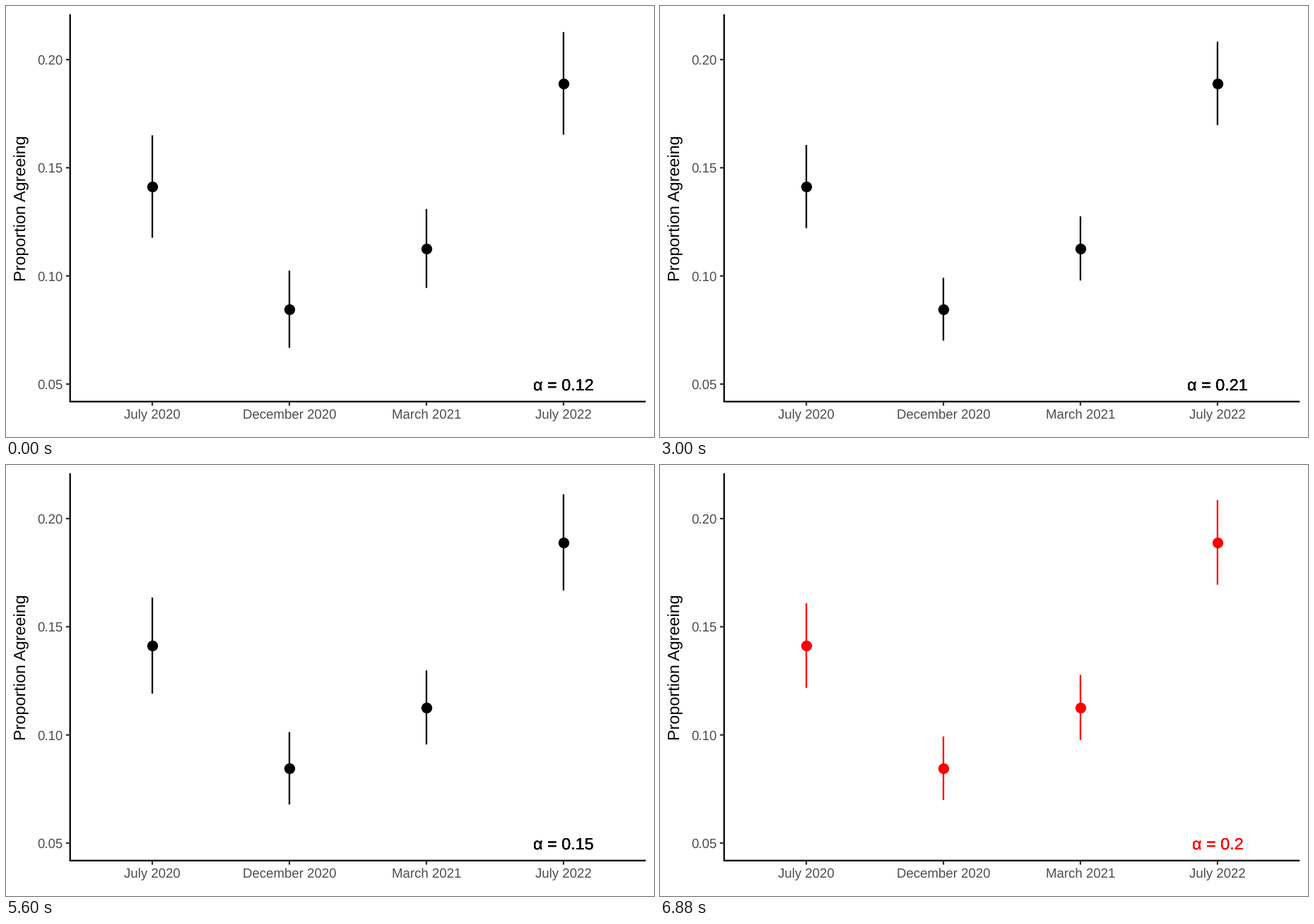
Animation of 917x611 px, one loop 8 s. Source, as a matplotlib script:

```python
import math

import matplotlib.pyplot as plt
import numpy as np
from matplotlib.animation import FuncAnimation

WIDTH, HEIGHT, DPI = 917, 611, 64
PT = 72 / DPI                      # points per pixel
LINE = 2.27 * PT
LEFT, RIGHT, TOP, BOTTOM = 90.7, 905.3, 11.7, 560.8
TICK = 5.8
SMALL, LARGE = 18.68, 23.35        # font sizes in pixels
CAP = 0.716                        # cap height relative to font size

FRAMES, INTERVAL = 200, 40
SWITCH = 105                       # transitions get shorter from here on
FLASH = 171                        # one grey frame, then the result in red

WAVES = ["July 2020", "December 2020", "March 2021", "July 2022"]
ESTIMATES = np.array([0.1413, 0.0846, 0.1127, 0.1890])
ERRORS = np.array([0.01523, 0.01148, 0.01174, 0.01526])

# Alpha in percent: up, back down, and up again to the chosen level.
LEVELS = [*range(12, 23), *range(22, 11, -1), *range(12, 21)]


def critical_value(alpha):
    grid = np.linspace(0, 3, 3001)
    coverage = [math.erf(z / math.sqrt(2)) for z in grid]
    return np.interp(1 - alpha, coverage, grid)


CRITICAL = [critical_value(level / 100) for level in LEVELS]


def x_px(index):
    return LEFT + (index + 0.6) * (RIGHT - LEFT) / 4.2


def y_px(value):
    return 536.0 - (value - 0.05) * 3067


def position(frame):
    """Place in LEVELS: a short linear move, then a rest on each level."""
    if frame < SWITCH:
        index, step = divmod(frame - 3, 6)
        moved = min((step + 1) / 3, 1)
    else:
        index, step = divmod(frame - SWITCH, 5)
        index += 17
        moved = min((step + 1) / 2, 1)
    return min(index + moved, len(LEVELS) - 1)


plt.rcParams.update({"font.family": "Liberation Sans", "text.hinting": "none"})
fig = plt.figure(figsize=(WIDTH / DPI, HEIGHT / DPI), dpi=DPI)
ax = fig.add_axes([0, 0, 1, 1])
ax.set_xlim(0, WIDTH)
ax.set_ylim(HEIGHT, 0)
ax.axis("off")


def draw_line(xs, ys, color="black"):
    return ax.plot(xs, ys, color=color, lw=LINE, snap=False,
                   solid_capstyle="butt", solid_joinstyle="miter")[0]


def draw_text(x, y, text, size, color="black", ha="center", rotation=0):
    return ax.text(x, y, text, fontsize=size * PT, color=color, ha=ha,
                   va="baseline", rotation=rotation, rotation_mode="anchor")


draw_line([LEFT, LEFT, RIGHT], [TOP, BOTTOM, BOTTOM])
tick_labels = []
for value in (0.05, 0.10, 0.15, 0.20):
    y = y_px(value)
    draw_line([LEFT - TICK, LEFT], [y, y], "#333333")
    tick_labels.append(
        draw_text(80.2, y + CAP * SMALL / 2, f"{value:.2f}", SMALL, ha="right"))
for i, wave in enumerate(WAVES):
    draw_line([x_px(i)] * 2, [BOTTOM, BOTTOM + TICK], "#333333")
    tick_labels.append(draw_text(x_px(i), 585.2, wave, SMALL))
draw_text(28.6, (TOP + BOTTOM) / 2, "Proportion Agreeing", LARGE, rotation=90)

bars = [draw_line([x_px(i)] * 2, [0, 0]) for i in range(len(WAVES))]
dots = [ax.plot(x_px(i), y_px(p), "o", ms=15.3 * PT, mew=0, snap=False)[0]
        for i, p in enumerate(ESTIMATES)]
# The label is printed once per wave, which thickens its edges.
labels = [draw_text(x_px(3), 545, "", LARGE) for _ in WAVES]


def update(frame):
    place = position(frame)
    reach = np.interp(place, range(len(LEVELS)), CRITICAL) * ERRORS
    level = LEVELS[int(place + 0.5)]

    flash = frame == FLASH
    ink = "#141414" if flash else "red" if frame > FLASH else "black"
    fig.set_facecolor("#8e8e8e" if flash else "white")
    for tick_label in tick_labels:
        tick_label.set_color("#0a0a0a" if flash else "#4d4d4d")

    for bar, estimate, half in zip(bars, ESTIMATES, reach):
        bar.set_ydata([y_px(estimate - half), y_px(estimate + half)])
    for label in labels:
        label.set_text(f"α = {level / 100:g}")
    for artist in bars + dots + labels:
        artist.set_color(ink)
    return bars + dots + labels + tick_labels


anim = FuncAnimation(fig, update, frames=FRAMES, interval=INTERVAL,
                     repeat=True, repeat_delay=0, blit=False)
plt.show()
```
